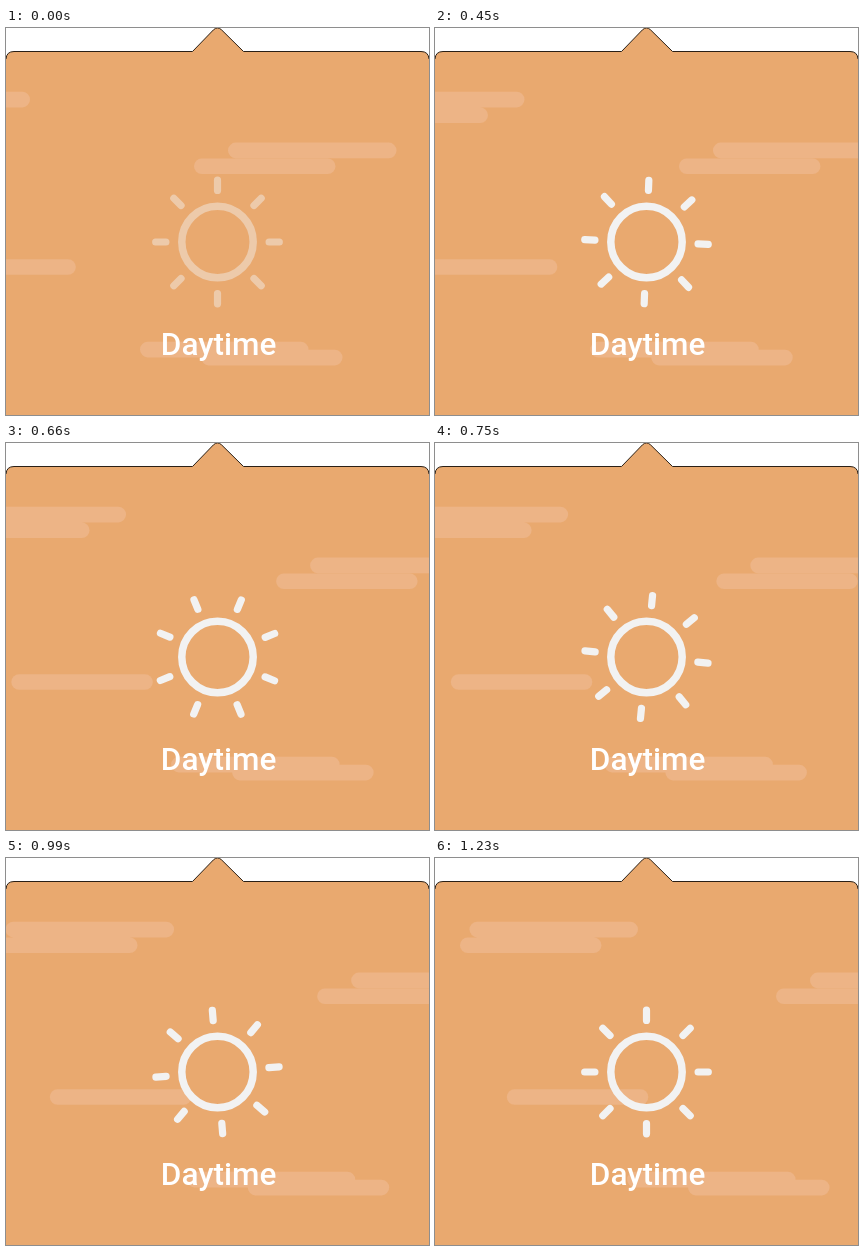
An HTML page with a canvas that plays this animation: 423 px wide and 387 px high, repeating every 1.26 s.

```html
<!DOCTYPE html>
<html lang="en">
<head>
<meta charset="utf-8">
<title>Daytime</title>
<style>
  html, body { margin: 0; width: 100%; height: 100%; overflow: hidden; background: #fff; }
  canvas { display: block; }
</style>
</head>
<body>
<canvas id="stage" width="423" height="387"></canvas>
<script>
const ctx = document.getElementById('stage').getContext('2d');
const LOOP = 1260, STEP = 30;
const SKY = '#e9a96f', CLOUD = '#edb486', SUN = '#f2f2f2';
const BAR_HEIGHT = 15.6;

// Bars are [left at time 0, top, width]; speed is in px per ms.
const clouds = [
  { speed: 0.1455, bars: [[-144.5, 63.8, 168.5], [-154, 79.4, 141.5]] },
  { speed: 0.1244, bars: [[222, 114.6, 168.5], [188, 130.4, 141.5]] },
  { speed: 0.1167, bars: [[-71.7, 231.2, 141.5]] },
  { speed: 0.0472, bars: [[134, 313.8, 168.5], [195, 321.8, 141.5]] }
];

function cubicBezier(x1, x2) {
  const xAt = s => 3 * x1 * s * (1 - s) ** 2 + 3 * x2 * s * s * (1 - s) + s ** 3;
  return x => {
    let low = 0, high = 1;
    for (let i = 0; i < 30; i++) {
      const mid = (low + high) / 2;
      if (xAt(mid) < x) low = mid; else high = mid;
    }
    return low * low * (3 - 2 * low);
  };
}
const spinEase = cubicBezier(0.68, 0.23);
const clamp01 = v => Math.min(1, Math.max(0, v));

function traceTop() {
  ctx.beginPath();
  ctx.moveTo(0, 31);
  ctx.quadraticCurveTo(0.5, 23.5, 8, 23.5);
  ctx.lineTo(186.5, 23.5);
  ctx.lineTo(207.5, 1.8);
  ctx.quadraticCurveTo(211.5, -2, 215.5, 1.8);
  ctx.lineTo(237.5, 23.5);
  ctx.lineTo(415, 23.5);
  ctx.quadraticCurveTo(422.5, 23.5, 423, 31);
}

function drawPanel() {
  ctx.fillStyle = '#fff';
  ctx.fillRect(0, 0, 423, 387);
  traceTop();
  ctx.lineTo(423, 387);
  ctx.lineTo(0, 387);
  ctx.fillStyle = SKY;
  ctx.fill();
  traceTop();
  ctx.strokeStyle = '#2b2016';
  ctx.lineWidth = 1;
  ctx.stroke();
}

function drawClouds(t) {
  ctx.fillStyle = CLOUD;
  for (const { speed, bars } of clouds) {
    ctx.beginPath();
    for (const [x, y, w] of bars) {
      ctx.roundRect(x + speed * t, y, w, BAR_HEIGHT, BAR_HEIGHT / 2);
    }
    ctx.fill();
  }
}

function drawSun(t) {
  ctx.save();
  ctx.translate(211.5, 214);
  ctx.globalAlpha = clamp01(0.45 + 0.00238 * t);
  ctx.strokeStyle = SUN;
  ctx.lineCap = 'round';
  ctx.lineWidth = 7.5;
  ctx.beginPath();
  ctx.arc(0, 0, 35.7, 0, Math.PI * 2);
  ctx.stroke();

  ctx.rotate(spinEase(clamp01((t - 300) / 930)) * Math.PI / 2);
  ctx.lineWidth = 7.2;
  ctx.beginPath();
  for (let i = 0; i < 8; i++) {
    const a = i * Math.PI / 4;
    ctx.moveTo(51.6 * Math.cos(a), 51.6 * Math.sin(a));
    ctx.lineTo(61.8 * Math.cos(a), 61.8 * Math.sin(a));
  }
  ctx.stroke();
  ctx.restore();
}

function drawLabel() {
  ctx.fillStyle = '#fff';
  ctx.font = '500 31.5px Roboto, sans-serif';
  ctx.fillText('Daytime', 154.8, 327);
}

function frame(now) {
  const t = Math.floor((now % LOOP) / STEP) * STEP;
  drawPanel();
  drawClouds(t);
  drawSun(t);
  drawLabel();
}

let start = null;
function tick(now) {
  if (start === null) start = now;
  frame(now - start);
  requestAnimationFrame(tick);
}
frame(0);
requestAnimationFrame(tick);
</script>
</body>
</html>
```
